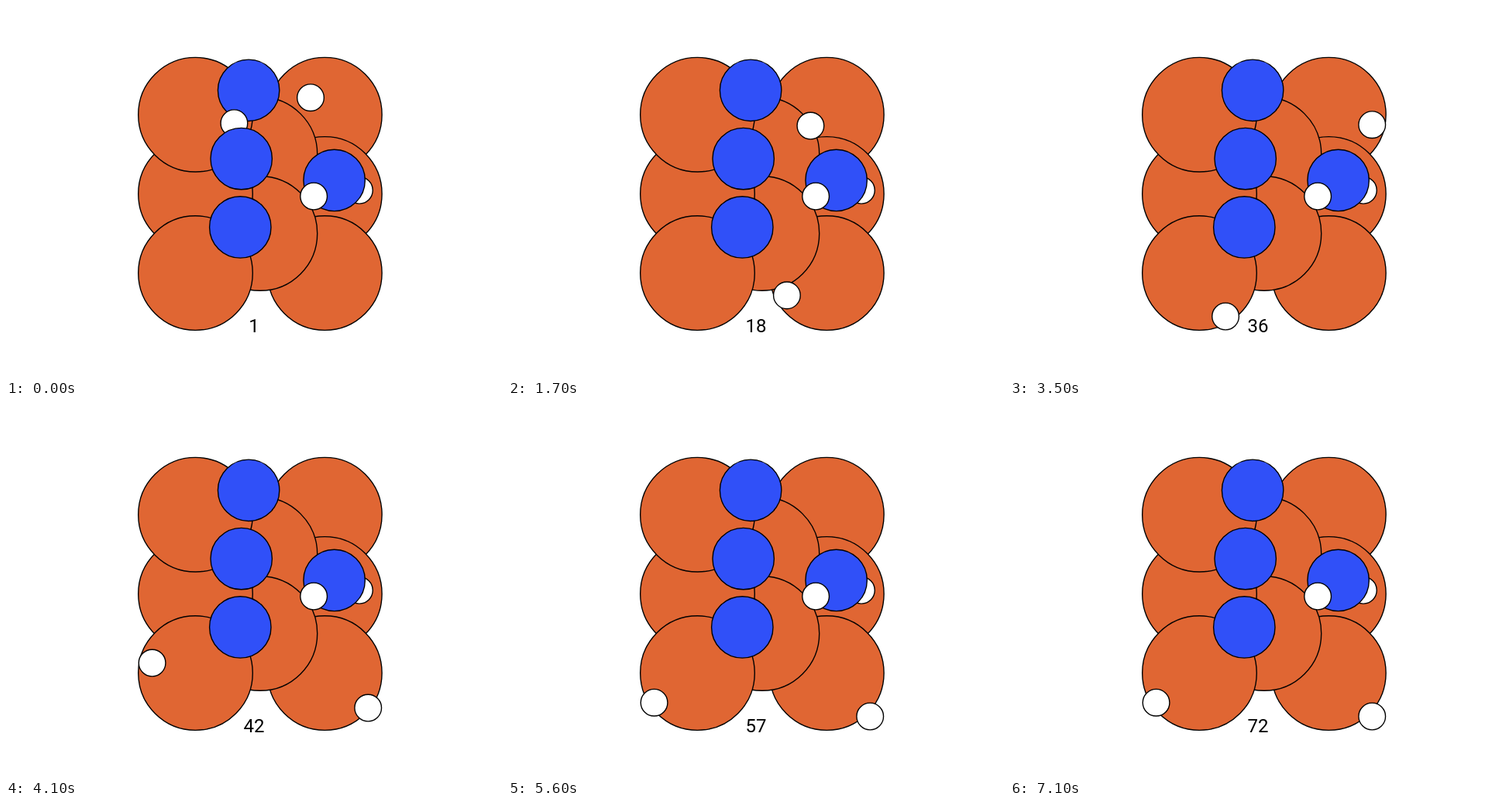
An HTML page for the animation above (8000 ms loop, 640 px wide and 480 px high).

```html
<!DOCTYPE html>
<html lang="en">
<head>
<meta charset="utf-8">
<title>Atoms on a surface</title>
<style>
  html, body { margin: 0; width: 100%; height: 100%; overflow: hidden; background: #fff; }
  svg { display: block; width: 640px; height: 480px; }
  circle { stroke: #000; stroke-width: 1.39; }
  text { font: 24px Roboto, "Liberation Sans", sans-serif; text-anchor: middle; }
</style>
</head>
<body>
<svg id="stage" viewBox="0 0 640 480"><text id="count" x="320" y="421.3">1</text></svg>
<script>
const stage = document.getElementById('stage');
const count = document.getElementById('count');
const LOOP = 8000, STEP = 100, LAST = 72;

// All sizes follow from the atomic radii and one scale
const SCALE = 55.9, CX = 327.9, CY = 242.4;
const DX = 1.492 * SCALE, DY = 1.828 * SCALE;
const kind = (fill, radius) => ({ fill, r: radius * SCALE });
const METAL = kind('#e06633', 1.32);
const BLUE = kind('#3050f8', 0.71);
const WHITE = kind('#fff', 0.31);

function atom({ fill, r }, x = 0, y = 0) {
  const c = document.createElementNS('http://www.w3.org/2000/svg', 'circle');
  c.setAttribute('fill', fill);
  c.setAttribute('r', r);
  stage.insertBefore(c, count);
  place(c, x, y);
  return c;
}

function place(c, x, y) {
  c.setAttribute('cx', x);
  c.setAttribute('cy', y);
}

// Metal slab, back to front: column, then its rows
const slab = [[1, [-1, 0, 1]], [0, [-0.5, 0.5]], [-1, [0, -1, 1]]];
for (const [col, rows] of slab) {
  for (const row of rows) atom(METAL, CX + col * DX, CY + row * DY);
}

// Bent chain of three, with one loose atom woven in after the first
const chain = k => atom(BLUE, 303.7 - 5.4 * k + 4 * k * k, 197.1 + 88.3 * k);
chain(-1);
const low = atom(WHITE);
chain(0);
chain(1);

// Molecule
const mx = 423.6, my = 224.9;
atom(WHITE, mx + 32.3, my + 12.9);
atom(BLUE, mx, my);
atom(WHITE, mx - 26.5, my + 20.6);

const high = atom(WHITE);

// The loose atoms drift between a few points and settle at the walls
const LEFT = CX - 139.3, RIGHT = CX + 139.3, FLOOR = CY + 158.1;
const times = [0, 1100, 2500, 3500, 4100, 5600];
const highPath = [[393, 118.2], [432.6, 155.2], [334.1, 153.6],
  [RIGHT, 153.2], [RIGHT, 389.6], [RIGHT, FLOOR]];
const lowPath = [[294.4, 151.2], [461.9, 384.6], [223.9, 358.4],
  [278.1, FLOOR], [LEFT, 331.6], [LEFT, 382.7]];

function along(path, t) {
  const i = times.findIndex(end => end > t);
  if (i < 0) return path.at(-1);
  const k = (t - times[i - 1]) / (times[i] - times[i - 1]);
  return path[i].map((end, axis) => {
    const from = path[i - 1][axis];
    return from + (end - from) * k;
  });
}

function draw(time) {
  const n = Math.min(Math.floor(time % LOOP / STEP), LAST - 1);
  place(high, ...along(highPath, n * STEP));
  place(low, ...along(lowPath, n * STEP));
  count.textContent = n + 1;
}

let start;
function tick(now) {
  start ??= now;
  draw(now - start);
  requestAnimationFrame(tick);
}
draw(0);
requestAnimationFrame(tick);
</script>
</body>
</html>
```
